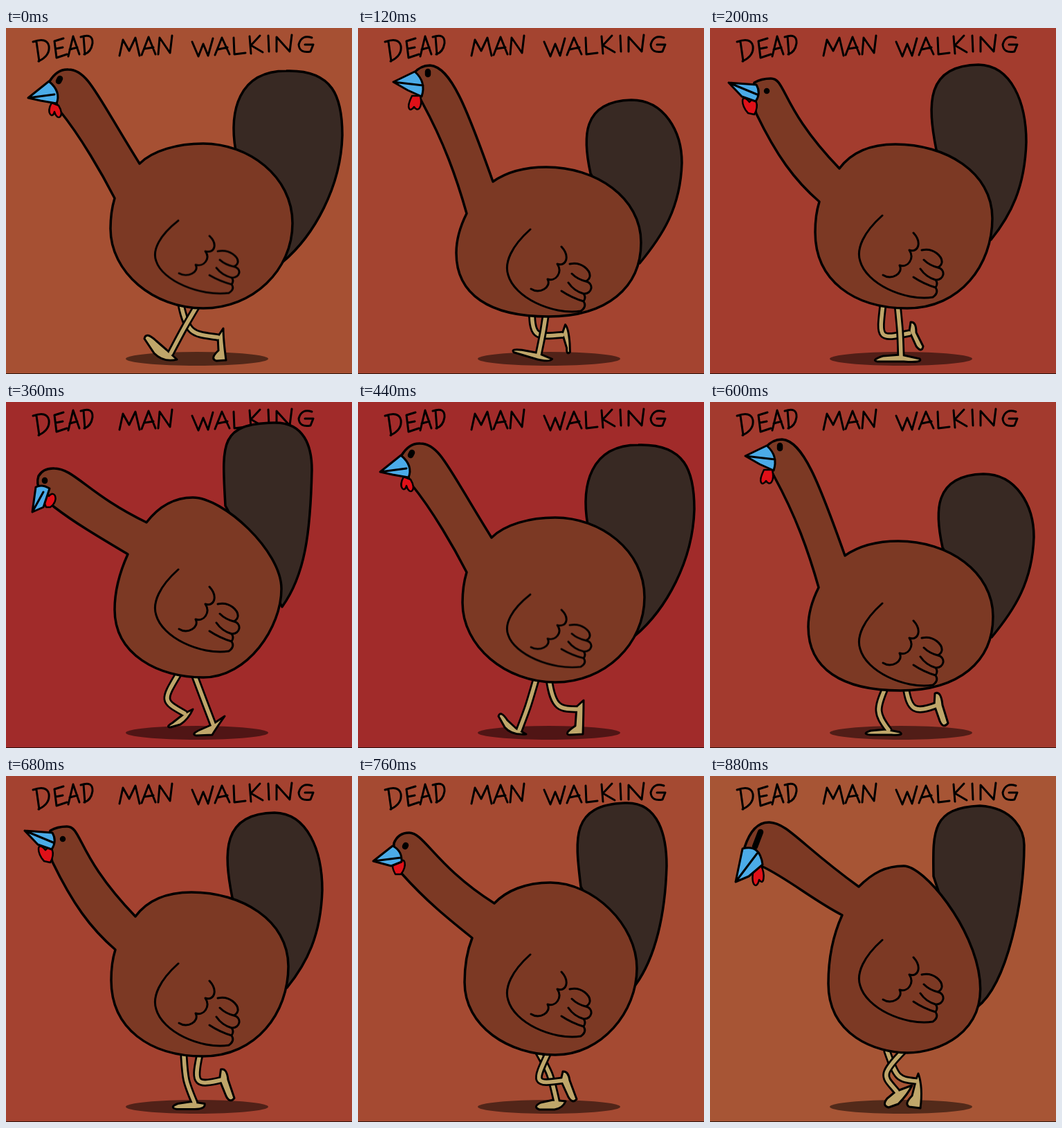
Write an HTML page without scripts that moves like this. It is 500 by 500 pixels and loops after 0.96 s.

```html
<!DOCTYPE html>
<html lang="en">
<head>
<meta charset="utf-8">
<title>Dead man walking</title>
<style>
html, body { margin: 0; width: 100%; height: 100%; overflow: hidden; }
svg { display: block; width: 100vw; height: 100vh; }
path { fill: none; stroke: #000; stroke-width: 3.5; stroke-linecap: round; stroke-linejoin: round; }
.lettering path, #wing { stroke-width: 3; }

svg, .bird, .leg, #wing { animation: 960ms -1ms infinite; }
svg { animation-name: glow; }
.bird { animation-name: strut; }
.leg { animation-name: step; }
#wing { animation-name: bob; }

@keyframes glow {
  0% { background: rgb(166,80,51); animation-timing-function: steps(10); }
  41.6666% { background: rgb(160,39,41); animation-timing-function: steps(12); }
  91.6666%, 100% { background: rgb(167,85,53); animation-timing-function: steps(1); }
}
/* Six body poses, a to f, run through once per footfall. */
@keyframes strut {
  0%, 50% { d: var(--a); animation-timing-function: steps(3); }
  12.5%, 62.5% { d: var(--b); animation-timing-function: steps(2); }
  20.8333%, 70.8333% { d: var(--c); animation-timing-function: steps(2); }
  29.1666%, 79.1666% { d: var(--d); animation-timing-function: steps(2); }
  37.5%, 87.5% { d: var(--e); animation-timing-function: steps(1); }
  41.6666%, 91.6666% { d: var(--f); animation-timing-function: steps(1); }
  45.8333% { d: var(--a); animation-timing-function: steps(1); }
  100% { d: var(--a); }
}
@keyframes bob {
  0%, 45.8333%, 50%, 100% { transform: translateY(64px) scaleY(.885); }
  0%, 50% { animation-timing-function: steps(3); }
  12.5%, 62.5% { transform: translateY(49px); animation-timing-function: steps(2); }
  20.8333%, 70.8333% { transform: translateY(29px); animation-timing-function: steps(2); }
  29.1666%, 79.1666% { transform: translateY(16px); animation-timing-function: steps(2); }
  37.5%, 87.5% { transform: translateY(0); animation-timing-function: steps(1); }
  41.6666%, 91.6666% { transform: translateY(-5px); animation-timing-function: steps(1); }
}
/* Seven leg poses, a to g, over a full stride. */
@keyframes step {
  0% { d: var(--a); animation-timing-function: steps(5); }
  20.8333% { d: var(--b); animation-timing-function: steps(4); }
  37.5% { d: var(--c); animation-timing-function: steps(2); }
  45.8333% { d: var(--d); animation-timing-function: steps(4); }
  62.5% { d: var(--e); animation-timing-function: steps(4); }
  79.1666% { d: var(--f); animation-timing-function: steps(3); }
  91.6666% { d: var(--g); animation-timing-function: steps(1); }
  100% { d: var(--a); }
}

#tail {
  fill: #382923;
  --a: path("M332 178C322 120 336 62 405 62C473 60 486 100 486 155C484 230 445 300 400 338Z");
  --b: path("M336 210C325 160 322 106 395 104C443 104 468 150 468 195C466 260 440 300 407 340Z");
  --c: path("M327 176C314 110 312 54 388 53C436 54 457 108 457 165C455 230 435 270 406 306Z");
  --d: path("M322 160C314 92 306 42 385 39C436 36 446 90 446 130C444 200 430 262 401 302Z");
  --e: path("M317 150C312 60 308 32 386 30C432 28 442 66 442 98C440 190 432 250 399 296Z");
  --f: path("M323 145C322 80 320 46 390 43C440 46 454 80 454 100C454 180 430 300 386 334Z");
}
#body {
  fill: #7c3924;
  --a: path("M193 196C212 177 248 167 285 167C350 167 414 214 414 282S357 405 285 405S151 353 151 290Q151 266 157 246C139 211 108 157 78 120Q66 95 63 77Q74 59 90 60C118 60 130 95 193 196Z");
  --b: path("M195 222C215 208 240 201 272 201C344 201 409 245 409 310S360 417 275 417S142 385 142 325Q142 298 157 268C142 215 124 165 93 108Q80 85 80 66Q90 54 104 54C134 56 157 115 195 222Z");
  --c: path("M187 203C204 180 232 168 268 168C340 168 408 208 408 275S362 405 285 405S152 365 152 295Q152 270 158 251C122 220 96 184 67 124Q58 95 64 79Q74 73 88 73C110 73 102 115 187 203Z");
  --d: path("M197 184C214 166 242 154 278 154C340 154 403 215 403 278S352 403 285 403S154 362 154 298Q154 262 165 234C130 206 98 180 64 142Q50 118 52 97Q58 82 74 82C96 82 112 130 197 184Z");
  --e: path("M203 174C220 152 242 138 270 138C314 138 398 215 398 270S350 398 285 398S157 365 157 300Q157 262 176 220C134 195 100 175 70 152Q40 128 47 107Q54 95 70 96C98 96 120 134 203 174Z");
  --f: path("M215 160C235 140 254 130 280 130C309 130 382 218 390 295S330 400 285 400S171 375 171 300Q171 245 191 201C150 180 112 148 76 131Q48 118 50 103Q62 66 86 67C112 68 132 100 215 160Z");
}
#wattle {
  fill: #e01018; stroke-width: 2.5;
  --a: path("M66 108C57 124 68 132 70 121C74 136 86 128 76 112Z");
  --b: path("M78 98C68 118 76 122 81 114C86 122 94 116 90 98Z");
  --c: path("M55 123C44 112 44 92 57 107C66 96 72 112 64 125Z");
  --d: path("M54 142C46 128 52 116 58 126C68 114 72 130 62 142Z");
  --e: path("M58 152C52 140 56 124 62 136C70 126 78 142 64 152Z");
  --f: path("M63 134C58 160 68 164 71 150C78 160 80 142 74 130Z");
}
#beak {
  fill: #4babe8; stroke-width: 3;
  --a: path("M32 101L62 77Q80 92 73 109L50 105ZM32 101L70 96");
  --b: path("M51 78L82 63Q99 78 92 99L72 90ZM51 78L94 83");
  --c: path("M27 79L67 82Q74 94 66 106L46 99ZM27 79L68 96");
  --d: path("M22 123L50 101Q64 108 63 124L48 130ZM22 123L62 118");
  --e: path("M38 159L43 123Q52 118 63 125L54 152ZM38 159L54 130");
  --f: path("M37 153L47 105Q72 98 76 128L56 145ZM37 153L68 112");
}
#eye {
  stroke-width: 8.5;
  --a: path("M78 73L76 77");
  --b: path("M101 63L101 67");
  --c: path("M82 91L82 91.1");
  --d: path("M69 100L68 102");
  --e: path("M56 113L56 114");
  --f: path("M73 81L65 102");
}

.shaft { stroke-width: 11; }
.foot { fill: #bfa66a; stroke-width: 3; }
/* Skin repeats the shaft, thinner, to leave an outline. */
.shaft.skin { stroke: #bfa66a; stroke-width: 5.5; }
.near.shaft {
  --a: path("M277 400C258 432 258 432 238 470");
  --b: path("M271 400C275 440 275 440 276 474");
  --c: path("M272 394C287 434 287 434 300 468");
  --d: path("M276 400C282 444 292 444 320 444");
  --e: path("M283 412C288 446 296 450 328 438");
  --f: path("M276 398C254 444 254 446 296 440");
  --g: path("M279 398C244 434 252 434 270 456");
}
.near.foot {
  --a: path("M232 465L217 452Q202 438 200 449L214 470Q228 484 247 479Z");
  --b: path("M276 472L250 474Q232 480 242 482L280 482Q308 484 303 478Z");
  --c: path("M298 466L282 473Q266 480 275 482L298 481Q302 474 316 454Z");
  --d: path("M316 440L314 468Q296 480 306 481L325 480Q326 450 326 431Z");
  --e: path("M324 438L332 461Q337 473 344 464L336 438Q334 417 325 421Z");
  --f: path("M293 440L304 464Q310 474 316 467L306 440Q304 426 296 427Z");
  --g: path("M268 456L256 466Q248 476 258 479L272 474Q286 460 292 447Z");
}
.far.shaft {
  --a: path("M253 400C262 444 272 442 306 447");
  --b: path("M250 400C244 450 244 450 288 441");
  --c: path("M250 392C226 432 226 432 258 450");
  --d: path("M257 402C246 440 246 440 233 474");
  --e: path("M254 412C240 444 240 450 258 474");
  --f: path("M260 398C278 430 278 430 287 470");
  --g: path("M256 398C270 438 272 438 298 441");
}
.far.foot {
  --a: path("M306 446L307 466Q294 478 304 481L318 480Q314 450 314 434Z");
  --b: path("M288 438L298 460Q306 470 308 460L298 440Q298 424 290 425Z");
  --c: path("M258 450L240 464Q230 470 238 470L252 466Q264 458 270 444Z");
  --d: path("M229 472L216 460Q206 445 203 454L212 470Q222 482 243 480Z");
  --e: path("M254 473L232 475Q218 480 232 481L262 481Q282 482 274 477Z");
  --f: path("M282 468L264 472Q252 478 262 482L284 482Q296 480 300 470Z");
  --g: path("M298 438L292 462Q280 474 288 478L304 480Q308 450 301 430Z");
}
</style>
</head>
<body>
<svg viewBox="0 0 500 500">
  <g class="lettering" role="img" aria-label="DEAD MAN WALKING">
    <path d="M44 20L48 48M39 20Q59 13 62 26Q64 40 47 48
      M83 15L70 19L73 43L88 38M72 30L82 28M90 41L97 12L106 38M92 31L103 28
      M112 12L114 38M108 13Q126 7 125 22Q123 35 113 38"/>
    <path d="M164 40L169 17L178 33L187 14L193 40
      M196 39L206 13L216 38M200 30L213 28M220 38L222 14L237 36L240 11"/>
    <path d="M269 20L278 41L285 23L292 40L299 15
      M302 39L312 14L323 38M306 31L320 28M329 14L330 38L346 36
      M352 12L354 37M367 11L354 25L371 35M379 11L380 34
      M391 34L391 13L410 34L413 10M442 14Q427 9 423 24Q424 37 440 34L444 24L432 24"/>
  </g>
  <ellipse cx="276" cy="478" rx="103" ry="10" opacity=".5"/>
  <path id="tail" class="bird"/>
  <path class="leg far shaft"/>
  <path class="leg far foot"/>
  <path class="leg far shaft skin"/>
  <path class="leg near shaft"/>
  <path class="leg near foot"/>
  <path class="leg near shaft skin"/>
  <path id="body" class="bird"/>
  <path id="wattle" class="bird"/>
  <path id="beak" class="bird"/>
  <path id="eye" class="bird"/>
  <path id="wing" d="M249 242C222 266 211 290 217 308C226 340 280 366 322 360Q331 354 326 346
    M306 292C324 288 336 302 335 310Q334 315 329 317Q317 314 309 306
    M329 317C342 320 338 336 326 335Q312 331 304 319
    M326 335Q330 340 326 346Q309 341 294 331
    M294 267C306 280 302 296 288 292C296 304 286 318 274 314C280 326 262 336 250 328"/>
  <rect y="499" width="500" height="1" opacity=".7"/>
</svg>
</body>
</html>
```
